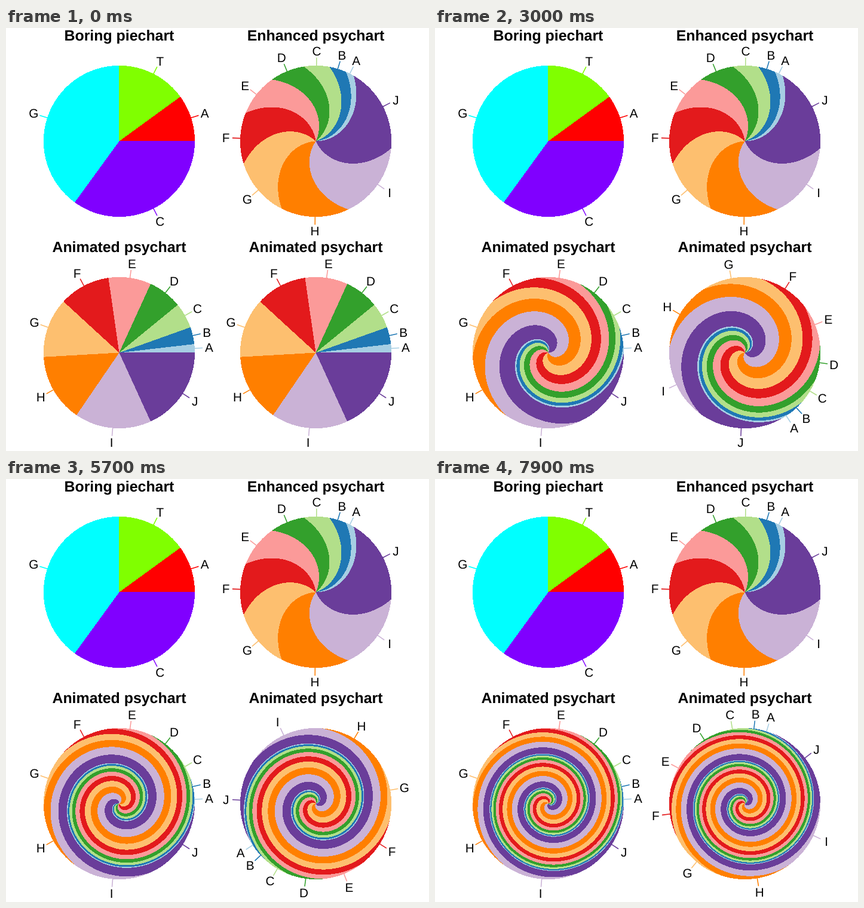
Animation, 708 px wide and 708 px high, one loop 8000 ms. Source, as an HTML page with a canvas:

```html
<!DOCTYPE html>
<html lang="en">
<head>
<meta charset="utf-8">
<title>Pie and psycharts</title>
<style>
  html, body { margin: 0; width: 100%; height: 100%; overflow: hidden; background: #fff; }
  canvas, svg { position: absolute; left: 0; top: 0; width: 708px; height: 708px; }
  text {
    font-family: "Liberation Sans", Arial, sans-serif;
    font-size: 20.75px;
    text-anchor: middle;
    text-rendering: geometricPrecision;
  }
  .title { font-size: 24.9px; font-weight: bold; }
  line { stroke-width: 1.56; stroke-linecap: round; }
</style>
</head>
<body>
<canvas id="discs" width="708" height="708"></canvas>
<svg id="marks" viewBox="0 0 708 708"></svg>
<script>
const SIZE = 708, STEP_MS = 100, STEPS = 80, TURN = 10;
// Each square plot fills half the stage less the title line; its axes run to 1.3
const PLOT = SIZE / 2 - 24.9, RADIUS = PLOT / 2 / 1.3;
const LEFT = SIZE / 2 - PLOT / 2, RIGHT = SIZE / 2 + PLOT / 2;
const TOP = SIZE / 2 - PLOT / 2, BOTTOM = SIZE - PLOT / 2;

const ctx = document.getElementById('discs').getContext('2d');
const svg = document.getElementById('marks');

const bases = {
  names: [...'ATGC'],
  values: [10, 15, 40, 35],
  colors: ['#ff0000', '#80ff00', '#00ffff', '#8000ff']
};
const letters = {
  names: [...'ABCDEFGHIJ'],
  values: [1, 2, 3, 4, 5, 6, 7, 8, 9, 10],
  colors: ['#a6cee3', '#1f78b4', '#b2df8a', '#33a02c', '#fb9a99',
           '#e31a1c', '#fdbf6f', '#ff7f00', '#cab2d6', '#6a3d9a']
};

// twist: degrees the centre lags behind the rim; spin: rotation of the rim
const charts = [
  { title: 'Boring piechart', x: LEFT, y: TOP, data: bases, twist: () => 0, spin: () => 0 },
  { title: 'Enhanced psychart', x: RIGHT, y: TOP, data: letters, twist: () => 60, spin: () => 60 },
  { title: 'Animated psychart', x: LEFT, y: BOTTOM, data: letters, twist: n => n * TURN, spin: () => 0 },
  { title: 'Animated psychart', x: RIGHT, y: BOTTOM, data: letters, twist: n => n * TURN, spin: n => n * TURN }
];

function add(tag, attrs, text = '') {
  const el = document.createElementNS('http://www.w3.org/2000/svg', tag);
  set(el, attrs);
  el.textContent = text;
  return svg.appendChild(el);
}

function set(el, attrs) {
  for (const key in attrs) el.setAttribute(key, attrs[key]);
}

// End angle, middle angle and colour of every slice
function slices({ names, values, colors }) {
  const total = values.reduce((a, b) => a + b);
  let sum = 0;
  return values.map((v, i) => {
    const mid = (sum + v / 2) / total * 360;
    sum += v;
    const rgb = [1, 3, 5].map(k => parseInt(colors[i].slice(k, k + 2), 16));
    return { name: names[i], color: colors[i], rgb, mid, end: sum / total * 360 };
  });
}

// Buffer offset and polar position of every pixel in a disc
function discPixels(cx, cy) {
  const list = [];
  for (let y = Math.floor(cy - RADIUS); y <= cy + RADIUS; y++) {
    for (let x = Math.floor(cx - RADIUS); x <= cx + RADIUS; x++) {
      const dx = x + 0.5 - cx, dy = y + 0.5 - cy;
      const r = Math.hypot(dx, dy) / RADIUS;
      if (r > 1) continue;
      list.push({ at: (y * SIZE + x) * 4, depth: 1 - r, angle: Math.atan2(-dy, dx) * 180 / Math.PI });
    }
  }
  return list;
}

for (const c of charts) {
  c.pixels = discPixels(c.x, c.y);
  c.parts = slices(c.data);
  add('text', { x: c.x, y: c.y - 168.5, class: 'title' }, c.title);
  for (const p of c.parts) {
    p.tick = add('line', { stroke: p.color });
    p.label = add('text', {}, p.name);
  }
}

const image = ctx.createImageData(SIZE, SIZE);

// Hard-edged fill: the slice boundaries wind evenly from rim to centre
function paintDisc(c, twist, spin) {
  for (const p of c.pixels) {
    const raw = p.angle - spin + twist * p.depth;
    const a = raw - Math.floor(raw / 360) * 360;
    let i = 0;
    while (i < c.parts.length - 1 && a >= c.parts[i].end) i++;
    const [r, g, b] = c.parts[i].rgb;
    image.data[p.at] = r;
    image.data[p.at + 1] = g;
    image.data[p.at + 2] = b;
    image.data[p.at + 3] = 255;
  }
}

function placeMarks(c, spin) {
  for (const p of c.parts) {
    const a = (p.mid + spin) * Math.PI / 180;
    const px = k => c.x + RADIUS * k * Math.cos(a);
    const py = k => c.y - RADIUS * k * Math.sin(a);
    set(p.tick, { x1: px(1), y1: py(1), x2: px(1.1), y2: py(1.1) });
    set(p.label, { x: px(1.19), y: py(1.19) + 7.3 });
  }
}

function draw(n) {
  for (const c of charts) {
    paintDisc(c, c.twist(n), c.spin(n));
    placeMarks(c, c.spin(n));
  }
  ctx.putImageData(image, 0, 0);
}

let shown = 0;
draw(0);
const start = performance.now();

function tick() {
  const n = Math.floor(Math.max(0, performance.now() - start) / STEP_MS) % STEPS;
  if (n !== shown) draw(shown = n);
  requestAnimationFrame(tick);
}
requestAnimationFrame(tick);
</script>
</body>
</html>
```
